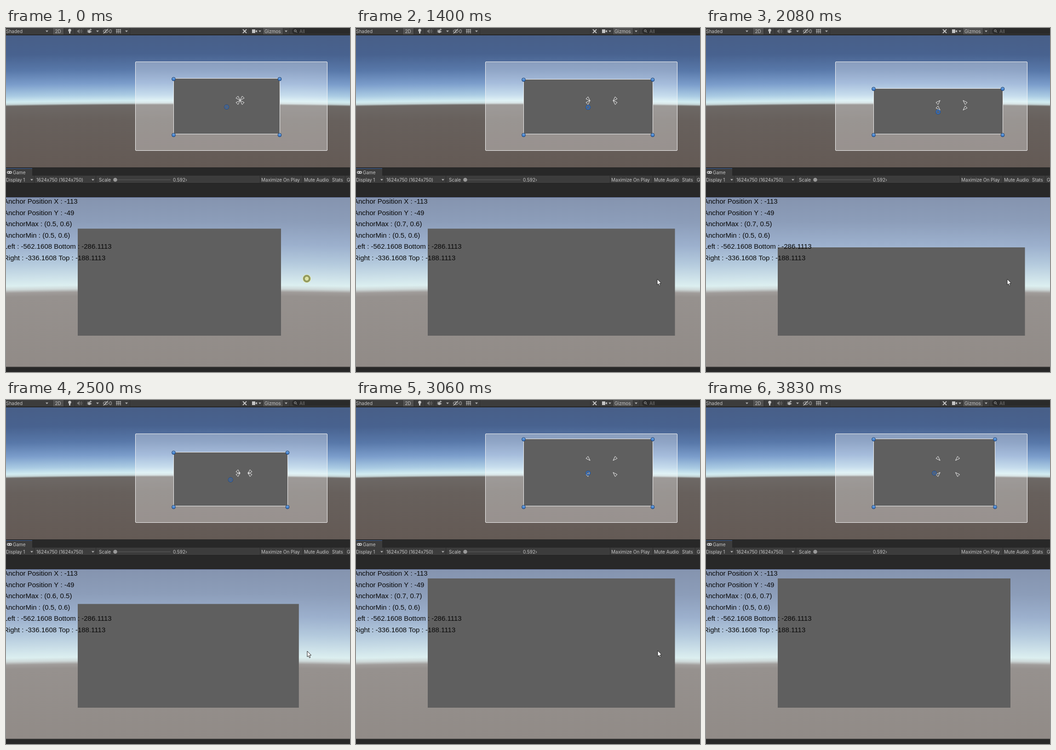
Animation, 748 px wide and 748 px high, one loop 4.49 s. Source, as an HTML page with a canvas:

```html
<!DOCTYPE html>
<html>
<head>
<meta charset="utf-8">
<style>
html, body { margin: 0; width: 100%; height: 100%; overflow: hidden; background: #282828; }
canvas { display: block; }
</style>
</head>
<body>
<canvas id="stage" width="748" height="748"></canvas>
<script>
const LOOP = 4490;
const stage = document.getElementById('stage');
let ctx = stage.getContext('2d');

const stamps = [0, 70, 140, 670, 1070, 1140, 1400, 1470, 1540, 1610, 1740, 1810];
for (let t = 2010; t <= 3830; t += 70) stamps.push(t);

// [time, value] keys, joined by straight lines
const rightKeys = [[140, 595], [670, 600], [1070, 645], [2080, 645], [2430, 615.3], [2500, 612],
  [2640, 606], [2920, 645], [3060, 645], [3340, 586], [3410, 591], [3550, 628.5]];
const topKeys = [[1140, 109], [1400, 110.5], [1740, 128.4], [1810, 128.4], [2010, 130.5], [2080, 130.5],
  [2290, 109], [2430, 112.8], [2500, 112.5], [2780, 75], [2920, 83.5]];
const cursorX = [[2990, 655], [3060, 656], [3410, 650.5], [3620, 660], [3690, 665], [3760, 679]];
const cursorY = [[2990, 546], [3060, 545], [3410, 535], [3620, 545], [3690, 566], [3760, 603]];

function at(keys, t) {
  if (t <= keys[0][0]) return keys[0][1];
  for (let i = 1; i < keys.length; i++) {
    const [t0, v0] = keys[i - 1], [t1, v1] = keys[i];
    if (t <= t1) return v0 + (v1 - v0) * (t - t0) / (t1 - t0);
  }
  return keys[keys.length - 1][1];
}

function box(x, y, w, h, color) {
  ctx.fillStyle = color;
  ctx.fillRect(x, y, w, h);
}

function label(text, x, y, color = '#c4c4c4', font = '10px Inter, sans-serif') {
  ctx.font = font;
  ctx.fillStyle = color;
  ctx.fillText(text, x, y);
}

function path(points, closed = true) {
  ctx.beginPath();
  points.forEach(([x, y]) => ctx.lineTo(x, y));
  if (closed) ctx.closePath();
}

function line(points, color = '#c4c4c4', width = 1) {
  path(points, false);
  ctx.strokeStyle = color;
  ctx.lineWidth = width;
  ctx.stroke();
}

function disc(x, y, r, fill, stroke, width = 1) {
  ctx.beginPath();
  ctx.arc(x, y, r, 0, Math.PI * 2);
  if (fill) { ctx.fillStyle = fill; ctx.fill(); }
  if (stroke) { ctx.strokeStyle = stroke; ctx.lineWidth = width; ctx.stroke(); }
}

function dropArrow(x, y) {
  path([[x - 3, y - 1.5], [x + 3, y - 1.5], [x, y + 2]]);
  ctx.fillStyle = '#b4b4b4';
  ctx.fill();
}

// Sky and ground with a slightly curved horizon
function skybox(y0, y1, stops) {
  const gradient = ctx.createLinearGradient(0, y0, 0, y1);
  stops.forEach(([y, color]) => gradient.addColorStop((y - y0) / (y1 - y0), color));
  ctx.save();
  ctx.beginPath();
  ctx.rect(0, y0, 748, y1 - y0);
  ctx.clip();
  ctx.fillStyle = gradient;
  for (let x = 0; x < 748; x += 4) {
    const bend = 3.5 * ((x - 370) / 374) ** 2;
    ctx.setTransform(1, 0, 0, 1, 0, bend);
    ctx.fillRect(x, y0 - 5, 4, y1 - y0 + 10);
  }
  ctx.restore();
}

function sceneToolbar() {
  box(0, 0, 748, 15, '#3c3c3c');
  box(0, 14, 748, 2, '#262626');
  box(102, 0, 23, 14, '#505050');
  box(559, 0, 43, 14, '#505050');
  [101, 126, 149, 171, 206, 234, 269, 509, 530, 558, 602, 616].forEach(x => box(x, 0, 1, 14, '#303030'));
  label('Shaded', 0, 10.5);
  label('2D', 106.5, 10.5);
  label('Gizmos', 562, 10.5);
  [[89, 7], [199, 7], [262, 7], [552, 7], [609, 7]].forEach(p => dropArrow(...p));

  disc(138.5, 5, 3.2, '#c4c4c4');
  box(137, 7, 3, 5, '#c4c4c4');
  box(155, 5, 2, 4, '#777');
  path([[157, 5], [160, 2], [160, 12], [157, 9]]);
  ctx.fill();
  line([[162, 4], [163, 7], [162, 10]], '#777');
  line([[164, 3], [165.5, 7], [164, 11]], '#777');
  path([[176, 8], [181, 6], [187, 8], [181, 11]]);
  ctx.fillStyle = '#c4c4c4';
  ctx.fill();
  line([[177, 5], [183, 5]], '#c4c4c4', 1.5);
  line([[184, 1], [184, 6]]);
  line([[181.5, 3.5], [186.5, 3.5]]);

  ctx.beginPath();
  ctx.ellipse(217, 7, 5.5, 3.2, 0, 0, Math.PI * 2);
  ctx.strokeStyle = '#c4c4c4';
  ctx.stroke();
  disc(217, 7, 1.4, '#c4c4c4');
  line([[212, 12], [222, 2]], '#c4c4c4', 1.2);
  label('0', 224, 10.5);
  [241, 245, 249].forEach(x => line([[x, 2], [x, 12]]));
  [4, 8].forEach(y => line([[239, y], [250, y]]));

  line([[515, 3], [523, 11]], '#c4c4c4', 2);
  line([[523, 3], [515, 11]], '#c4c4c4', 2);
  box(535, 3, 7, 8, '#c4c4c4');
  path([[542, 7], [546, 4], [546, 10]]);
  ctx.fill();

  ctx.beginPath();
  ctx.roundRect(622, 0, 140, 13, 6);
  ctx.fillStyle = '#2a2a2a';
  ctx.fill();
  disc(629, 6, 2.2, null, '#b0b0b0');
  line([[631, 8], [633, 10]], '#b0b0b0');
  label('All', 638, 10.5, '#777');
}

function gameToolbar() {
  box(0, 303, 748, 18, '#282828');
  box(0, 306, 57, 15, '#3c3c3c');
  box(0, 305, 57, 1, '#3b62a0');
  ctx.beginPath();
  ctx.roundRect(2, 311, 11, 6, 3);
  ctx.fillStyle = '#c4c4c4';
  ctx.fill();
  disc(5, 314, 1.2, '#3c3c3c');
  disc(10, 314, 1.2, '#3c3c3c');
  label('Game', 15, 317.5);

  box(0, 321, 748, 17, '#3c3c3c');
  box(0, 337, 748, 31, '#282828');
  box(0, 337, 748, 1, '#202020');
  [61, 195, 552, 645, 706, 737].forEach(x => box(x, 321, 1, 16, '#2c2c2c'));
  label('Display 1', 0, 333.5);
  label('1624x750 (1624x750)', 66, 333.5);
  label('Scale', 202, 333.5);
  label('0.592›', 363, 333.5);
  label('Maximize On Play', 555, 333.5);
  label('Mute Audio', 648, 333.5);
  label('Stats', 709, 333.5);
  label('G', 741, 333.5);
  dropArrow(56, 330);
  dropArrow(189, 330);
  box(242, 329.5, 116, 1, '#606060');
  disc(237.5, 330, 4.3, '#999');
}

function paintBackdrop() {
  skybox(16, 303, [[16, '#485f88'], [55, '#48628f'], [90, '#5878a9'], [120, '#7b9dcb'], [145, '#aacbe3'],
    [158, '#d2ecf1'], [163, '#c5d6d8'], [167, '#6d6865'], [200, '#67605c'], [303, '#645a55']]);
  ctx.beginPath();
  ctx.roundRect(281.5, 73.5, 417, 193, 1.5);
  ctx.fillStyle = 'rgba(255,255,255,.33)';
  ctx.fill();
  ctx.strokeStyle = '#f4f4f4';
  ctx.lineWidth = 1;
  ctx.stroke();
  skybox(368, 737, [[368, '#8594af'], [420, '#8c9db9'], [470, '#9cb0cd'], [510, '#b4cadd'], [540, '#cde1e9'],
    [558, '#dceff0'], [566, '#ced8d8'], [573, '#a09c9a'], [582, '#96918e'], [737, '#918b87']]);
  box(0, 368, 748, 1, '#6374a0');
  box(0, 737, 748, 11, '#282828');
  box(0, 736.5, 748, 1, '#4a4846');
  sceneToolbar();
  gameToolbar();
}

const backdrop = document.createElement('canvas');
backdrop.width = backdrop.height = 748;

function anchorArrow(x, y, sx, sy) {
  path([[x, y], [x + 9 * sx, y + 4.5 * sy], [x + 4.5 * sx, y + 9 * sy]]);
  ctx.strokeStyle = '#f2f2f2';
  ctx.lineWidth = 1;
  ctx.stroke();
}

function handle(x, y) {
  const shine = ctx.createLinearGradient(0, y - 4, 0, y + 4);
  shine.addColorStop(0, '#79afe9');
  shine.addColorStop(1, '#2d6fc4');
  disc(x, y, 3.9, shine, '#1f3c66');
}

function drawScene(right, top) {
  const left = 364.5, bottom = 230.5;
  box(left, top + .5, right - left, bottom - top - .5, '#5f5f5f');
  ctx.strokeStyle = '#f0f0f0';
  ctx.lineWidth = 1;
  ctx.strokeRect(left, Math.round(top) + .5, Math.round(right - left), bottom - Math.round(top) - .5);

  const maxX = right - 86, maxY = top + 48;
  [[509, -1], [maxX, 1]].forEach(([x, sx]) => {
    anchorArrow(x, maxY, sx, -1);
    anchorArrow(x, 157.5, sx, 1);
  });
  [left, right].forEach(x => { handle(x, top + 2); handle(x, 232.7); });
  const active = right > 640;
  disc((left + right) / 2, (top + 234.5) / 2, 4.4, 'rgba(60,110,180,.35)', '#1d3860', 2);
  disc((left + right) / 2, (top + 234.5) / 2, 4.2, null, active ? '#2f7be0' : '#4470ad', 1.3);
}

function drawGame(right, top) {
  const x = 598 + (right - 595) * 1.91, y = 388 + (top - 83.5) * 1.894;
  box(156, y, x - 156, 669 - y, '#5f5f5f');
  const maxX = (right - 86 - 281) / 418, maxY = (266 - top - 48) / 193;
  [
    'Anchor Position X : -113',
    'Anchor Position Y : -49',
    `AnchorMax : (${maxX.toFixed(1)}, ${maxY.toFixed(1)})`,
    'AnchorMin : (0.5, 0.6)',
    'Left : -562.1608 Bottom : -286.1113',
    'Right : -336.1608 Top : -188.1113'
  ].forEach((text, i) =>
    label(text, -5, 382 + i * 24.55, '#080808', '15px "Liberation Sans", Arial, sans-serif'));
}

function drawPointer(t) {
  if (t < 70) {
    disc(654, 545, 9.3, '#e3ebb9');
    disc(654, 545, 6.2, '#dce3a4', '#92995f', 4);
    return;
  }
  if (t >= 3830) return;
  if (t < 140) disc(654, 545, 9.3, 'rgba(227,235,185,.6)');
  const x = at(cursorX, t), y = at(cursorY, t);
  path([[0, 0], [0, 12.5], [2.8, 10], [4.8, 14.7], [6.8, 13.8], [4.9, 9.3], [8.6, 9]]
    .map(([dx, dy]) => [x + dx, y + dy]));
  ctx.fillStyle = '#fff';
  ctx.fill();
  ctx.strokeStyle = '#222';
  ctx.lineWidth = 1;
  ctx.stroke();
}

function draw(now) {
  const t = now % LOOP;
  const step = stamps.filter(s => s <= t).length - 1;
  const sceneTime = stamps[step];
  // The game view trails the scene view by one step while dragging
  const gameTime = step < 4 ? sceneTime : stamps[step - 1];
  ctx.drawImage(backdrop, 0, 0);
  drawScene(at(rightKeys, sceneTime), at(topKeys, sceneTime));
  drawGame(at(rightKeys, gameTime), at(topKeys, gameTime));
  drawPointer(sceneTime);
}

const screen = ctx;
ctx = backdrop.getContext('2d');
paintBackdrop();
ctx = screen;

const start = performance.now();
function tick() {
  draw(performance.now() - start);
  requestAnimationFrame(tick);
}
tick();
</script>
</body>
</html>
```
